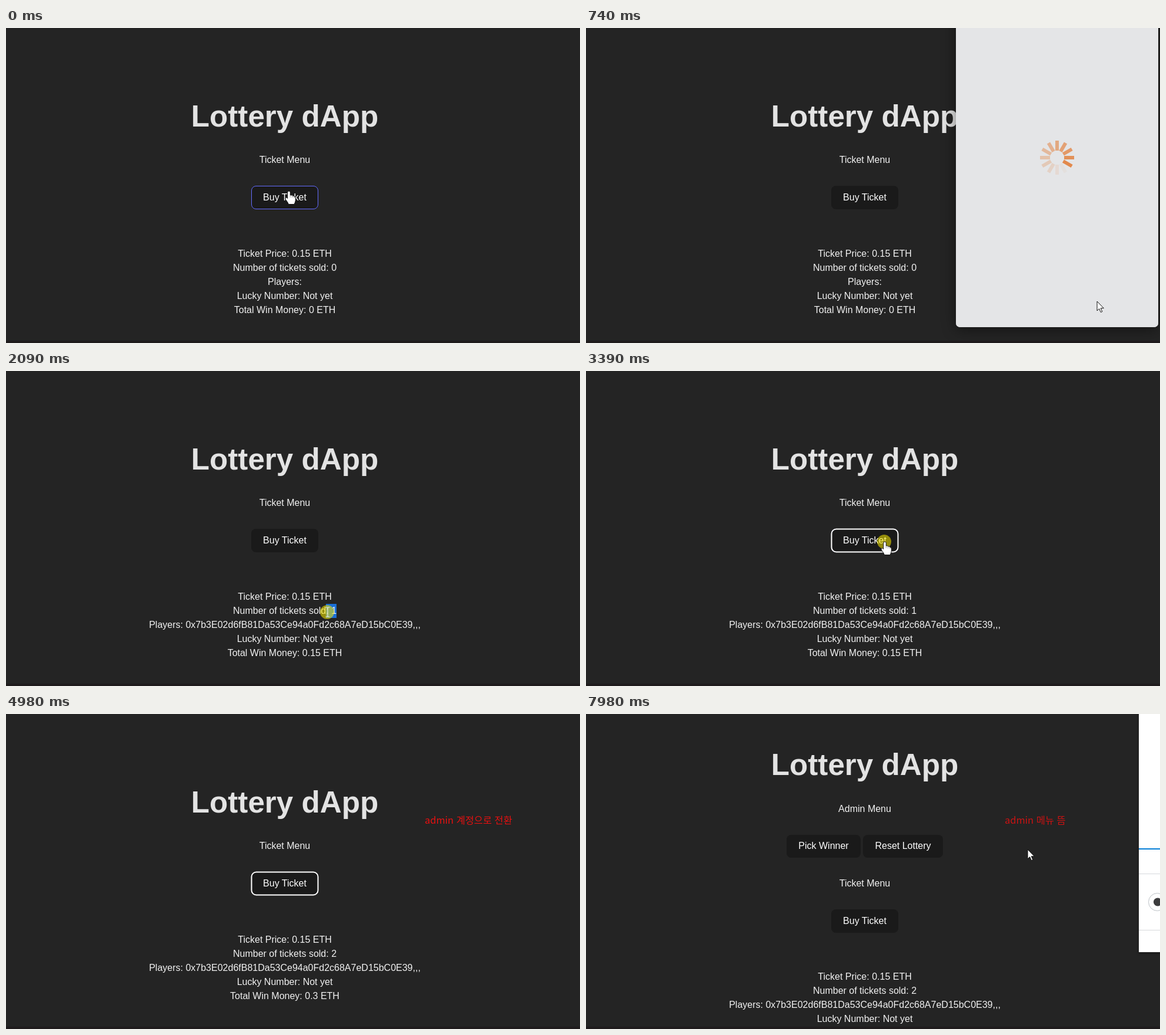
Animation, 976 px wide and 537 px high, one loop 8 s. Source, as an HTML page:

```html
<!DOCTYPE html>
<html lang="ko">
<head>
<meta charset="utf-8">
<title>Lottery</title>
<style>
  html, body { margin: 0; width: 100%; height: 100%; overflow: hidden; background: #242424; }
  svg { display: block; width: 976px; height: 537px; }
  text { white-space: pre; }
  .page { font: 16px "Liberation Sans", Arial, sans-serif; fill: #f2f2f2; text-anchor: middle; }
  .page .title { font-size: 51.2px; font-weight: bold; fill: #e3e3e3; }
  .page .label { fill: #fff; }
  .wallet { font: 13px "Noto Sans CJK KR", "Noto Sans CJK JP", "Noto Sans CJK", sans-serif; fill: #24272a; }
  .num { font-family: Inter, "Noto Sans", sans-serif; font-size: 12px; }
  .window { filter: drop-shadow(0 4px 12px rgba(0, 0, 0, .45)); }
  .edge { filter: drop-shadow(0 2px 2px rgba(0, 0, 0, .4)); }
  .blue { fill: #037dd6; }
  .grey { fill: #535a61; }
  .faint { fill: #ebecee; }
  .bold { font-weight: bold; }
  .end { text-anchor: end; }
  .mid { text-anchor: middle; }
  .rule { stroke: #d6d9dc; fill: none; }
  .caption { font: 16.4px "Noto Sans CJK KR", "Noto Sans CJK JP", "Noto Sans CJK", sans-serif; fill: #e81010; }
</style>
</head>
<body>
<svg viewBox="0 0 976 537" xmlns="http://www.w3.org/2000/svg">
  <defs>
    <clipPath id="left-avatar"><circle cx="658" cy="6" r="13"/></clipPath>
    <clipPath id="right-avatar"><circle cx="845" cy="6" r="13"/></clipPath>
    <clipPath id="scroller"><rect x="630" y="129" width="327" height="325"/></clipPath>
  </defs>
  <rect width="976" height="537" fill="#242424"/>

  <g class="page">
    <text class="title" id="title" x="474" y="168">Lottery dApp</text>
    <g id="admin">
      <text x="474" y="167">Admin Menu</text>
      <rect x="341" y="206" width="126" height="39" rx="8" fill="#1a1a1a"/>
      <text class="label" x="404" y="230">Pick Winner</text>
      <rect x="471" y="206" width="136" height="39" rx="8" fill="#1a1a1a"/>
      <text class="label" x="539" y="230">Reset Lottery</text>
    </g>
    <g id="ticket">
      <text x="474" y="230">Ticket Menu</text>
      <rect x="417" y="269" width="114" height="40" rx="8" fill="#1a1a1a"/>
      <rect id="hover" x="417.5" y="269.5" width="113" height="39" rx="7.5" fill="none" stroke="#646cff"/>
      <rect id="ring" x="417.5" y="269.5" width="113" height="39" rx="8" fill="none" stroke="#fff" stroke-width="2"/>
      <text class="label" x="474" y="294">Buy Ticket</text>
    </g>
    <g id="stats">
      <rect id="select" x="544" y="397" height="24" fill="#1a6fd6"/>
      <text x="474" y="390">Ticket Price: 0.15 ETH</text>
      <text id="sold" x="474" y="414"></text>
      <text id="players" x="474" y="438"></text>
      <text x="474" y="462">Lucky Number: Not yet</text>
      <text id="total" x="474" y="486"></text>
    </g>
  </g>
  <rect y="533" width="976" height="4" fill="#1f1c1d"/>

  <g id="popup" class="wallet">
    <path class="window" fill="#fff" d="M630-20H974V525q0 8-8 8H638q-8 0-8-8Z"/>
    <g id="confirm">
      <g clip-path="url(#left-avatar)">
        <rect x="645" y="-8" width="26" height="28" fill="#2447d8"/>
        <path d="M654-8L658 6L650 4L648-8ZM659-8H672V8L655 5Z" fill="#f5a50a"/>
      </g>
      <text class="num" x="684" y="10">Account 5</text>
      <path class="rule" d="M802.5 22V28M630 27.5H974M630 128.5H974M630 454.5H974"/>
      <circle class="rule" cx="802" cy="6" r="16"/>
      <path d="M795 6H808M803 1L808 6L803 11" fill="none" stroke="#bbc0c5" stroke-width="2.5"/>
      <g clip-path="url(#right-avatar)">
        <rect x="832" y="-8" width="26" height="28" fill="#f5a50a"/>
        <path d="M832 8L858 12V20H832Z" fill="#078a8c"/>
      </g>
      <text class="num" x="870" y="10">0x9D2...4cfa</text>

      <rect x="646.5" y="44.5" width="311" height="67" rx="8" fill="#e6f1fb" stroke="#037dd6"/>
      <text x="663" y="73">새 주소가 발견되었습니다! 여기를 클릭하여 주소록</text>
      <text x="663" y="90">에 추가하세요.</text>

      <g clip-path="url(#scroller)">
        <rect x="630" y="129" width="327" height="45" fill="#f2f3f4"/>
        <circle class="blue" cx="672" cy="117" r="16"/>
        <text class="num grey" x="658" y="153" style="font-size:14px">$178.94</text>
        <text x="638" y="195">세부 정보</text>
        <text class="grey" x="706" y="195">데이터</text>
        <text class="grey" x="756" y="195" font-size="12.4">16진수</text>
        <path d="M630 208.5H957M654 333.5H933" stroke="#bbc0c5"/>
        <rect class="blue" x="630" y="206" width="67" height="2"/>
        <text class="blue end" x="933" y="245">편집</text>
        <text class="bold" x="654" y="279" font-size="15">예상 가스 요금</text>
        <circle cx="754" cy="273" r="6" fill="#555b7c"/>
        <path d="M754 269V270.6M754 272V277" stroke="#fff" stroke-width="2"/>
        <text class="num faint end" x="841" y="278">$80.19</text>
        <text class="num faint bold end" x="933" y="278" style="font-size:12.8px">0.06722 ETH</text>
        <text x="654" y="304" font-style="italic">추천 사이트</text>
        <text class="bold" x="787" y="304">최대 요금</text>
        <text class="num faint end" x="933" y="304" style="font-size:11.5px">0.06721975 ETH</text>
        <text class="num faint end" x="933" y="371">$269.13</text>
        <text class="bold" x="654" y="386" font-size="15">합계</text>
        <text class="num faint bold end" x="933" y="399" style="font-size:12.8px">0.21721975 ETH</text>
        <text x="654" y="425">금액 + 가스 요금</text>
        <text class="faint" x="785" y="425">최대 금액:</text>
        <text class="num faint end" x="933" y="425" style="font-size:11.5px">0.21721975 ETH</text>
      </g>

      <rect x="957" y="129" width="16" height="401" fill="#f1f1f1"/>
      <rect x="959" y="226" width="13" height="290" fill="#c1c1c1"/>
      <path d="M961 140L965 135L969 140Z" fill="#505050"/>
      <path d="M961 522L965 527L969 522Z" fill="#a3a3a3"/>
      <path fill="#fff" d="M630 455H957V533H638q-8 0-8-8Z"/>
      <rect x="646.5" y="471.5" width="139" height="45" rx="22.5" fill="#fff" stroke="#037dd6"/>
      <rect x="802" y="474" width="139" height="46" rx="23" fill="#037dd6" opacity=".12"/>
      <rect class="blue" x="802" y="471" width="139" height="46" rx="23"/>
      <text class="blue mid" x="716" y="497" font-size="15">거부</text>
      <text class="mid" x="871" y="497" font-size="15" style="fill:#fff">확인</text>
    </g>
    <g id="loading">
      <path fill="#e4e5e7" d="M630-20H974V525q0 8-8 8H638q-8 0-8-8Z"/>
      <g id="spinner"></g>
    </g>
  </g>

  <g id="panel">
    <rect class="edge" x="940" y="-20" width="60" height="426" fill="#fff"/>
    <path class="rule" d="M940 272.5H976M940 368.5H976"/>
    <rect class="blue" x="940" y="229" width="36" height="2"/>
    <circle cx="971.5" cy="320.5" r="15" fill="#fff" stroke="#bbc0c5"/>
    <circle cx="972" cy="320.5" r="7" fill="#3c3c3d"/>
  </g>

  <text id="caption" class="caption" x="712" y="187"></text>
  <circle id="click" r="12" fill="#f4e600" opacity=".56"/>
  <g id="cursor" stroke-linejoin="round">
    <path id="arrow" d="M0 0V16L3.7 12.6L6.3 18.6L8.8 17.5L6.2 11.7H11.3Z" fill="#fff" stroke="#111"/>
    <g id="hand">
      <path d="M-2.3 2Q-2.3 0 0 0T2.3 2V7Q4.6 6.3 5.5 8Q8 7.3 8.7 9.3Q11.3 9 11.3 12V16Q11 19 9 22.5H-.5Q-2 18.5-5.5 14.5Q-7 11.5-4.5 11Q-3.3 11-2.3 12.6Z" fill="#fff" stroke="#111"/>
      <path d="M2.3 7V11M5.5 8V11.5M8.7 9.3V12" stroke="#777" stroke-width=".7"/>
    </g>
    <path id="beam" d="M-3.5-8H-1L0-7L1-8H3.5M0-7V7M-3.5 8H-1L0 7L1 8H3.5" fill="none" stroke="#e6e6e6" stroke-width="1.2"/>
  </g>
</svg>
<script>
const LOOP = 8000, STEP = 68;
const $ = id => document.getElementById(id);
const show = (id, on) => { $(id).style.display = on ? '' : 'none'; };
const move = (id, x, y) => $(id).setAttribute('transform', `translate(${x} ${y})`);
const within = (t, ...spans) => spans.some(([a, b]) => t >= a && t < b);
const write = (id, s) => { if ($(id).textContent !== s) $(id).textContent = s; };

const ADDRESS = '0x7b3E02d6fB81Da53Ce94a0Fd2c68A7eD15bC0E39';

// time, x, y, cursor shape
const PATH = [
  [0, 481, 278, 'hand'], [400, 481, 278, 'hand'], [590, 869, 466, 'hand'],
  [660, 869, 466, 'arrow'], [810, 869, 466, 'arrow'], [950, 776, 298, 'arrow'],
  [1020, 776, 294, 'arrow'], [1680, 776, 294, 'arrow'], [1880, 562, 411, 'beam'],
  [2080, 547, 411, 'beam'], [2220, 547, 411, 'beam'], [2360, 647, 438, 'beam'],
  [2690, 647, 438, 'arrow'], [3230, 508, 291, 'hand'], [3670, 508, 291, 'hand'],
  [4060, 891, 500, 'hand'], [4700, 891, 500, 'arrow'], [4980, 1000, -30, ''],
  [7500, 892, 231, 'arrow'], [7910, 892, 231, 'arrow'], [7975, 751, 231, 'arrow'], [LOOP, 751, 231, 'arrow']
];

function pointer(t) {
  let i = 0;
  while (i < PATH.length - 2 && t >= PATH[i + 1][0]) i++;
  const [t0, x0, y0, shape] = PATH[i], [t1, x1, y1] = PATH[i + 1];
  const k = Math.floor((t - t0) / STEP) * STEP / (t1 - t0);
  const e = k * k * (3 - 2 * k);
  return { x: Math.round(x0 + (x1 - x0) * e), y: Math.round(y0 + (y1 - y0) * e), shape };
}

$('spinner').innerHTML = Array.from({ length: 12 }, (_, i) =>
  `<rect x="12" y="-3" width="17" height="6" fill="#e2894c" opacity="${Math.max(.06, 1 - i * .087)}" transform="rotate(${30 - i * 30})"/>`
).join('');

function drawPage(t) {
  const sold = t < 1680 ? 0 : t < 4840 ? 1 : 2;
  const admin = t >= 7450;
  write('sold', `Number of tickets sold: ${sold}`);
  write('players', sold ? `Players: ${ADDRESS},,,` : 'Players:');
  write('total', `Total Win Money: ${['0', '0.15', '0.3'][sold]} ETH`);
  move('title', 0, admin ? -64 : 0);
  move('ticket', 0, admin ? 64 : 0);
  move('stats', 0, admin ? 63 : 0);
  show('admin', admin);
  show('hover', within(t, [0, 400], [3230, 3670]));
  show('ring', within(t, [270, 400], [880, 1880], [3300, 3530], [4780, 5970], [6370, 7110]));
  show('select', within(t, [1950, 3300]));
  const left = t < 2020 ? 553 : 544;
  $('select').setAttribute('x', left);
  $('select').setAttribute('width', 562 - left);
}

function drawWallet(t) {
  const first = t < 1000;
  show('popup', within(t, [400, 880], [3670, 4700]));
  move('popup', first ? -1 : 0, first ? -23 : 0);
  const ready = within(t, [470, 670], [3800, 4560]);
  show('confirm', ready);
  show('loading', !ready);
  show('spinner', !within(t, [400, 440], [3670, 3740]));
  const turn = Math.floor((t - 740) / 83) * 30;
  $('spinner').setAttribute('transform', `translate(802 244) rotate(${turn})`);
  show('panel', t >= 7110);
  $('panel').style.opacity = t < 7180 ? .245 : t < 7250 ? .6 : t < 7310 ? .88 : 1;
}

function drawOverlay(t) {
  const p = pointer(t);
  write('caption', within(t, [4350, 7110]) ? 'admin 계정으로 전환' : t >= 7910 ? 'admin 메뉴 뜸' : '');
  $('caption').style.opacity = t < 7910 ? 1 : t < 7980 ? .6 : .85;
  for (const s of ['arrow', 'hand', 'beam']) show(s, p.shape === s);
  move('cursor', p.x, p.y);
  show('click', within(t, [200, 330], [590, 670], [1880, 2220], [3300, 3460], [4490, 4620]));
  move('click', p.x - 1, p.y);
}

function draw(t) {
  drawPage(t);
  drawWallet(t);
  drawOverlay(t);
}

const start = performance.now();
function tick() {
  draw((performance.now() - start) % LOOP);
  requestAnimationFrame(tick);
}
tick();
</script>
</body>
</html>
```
